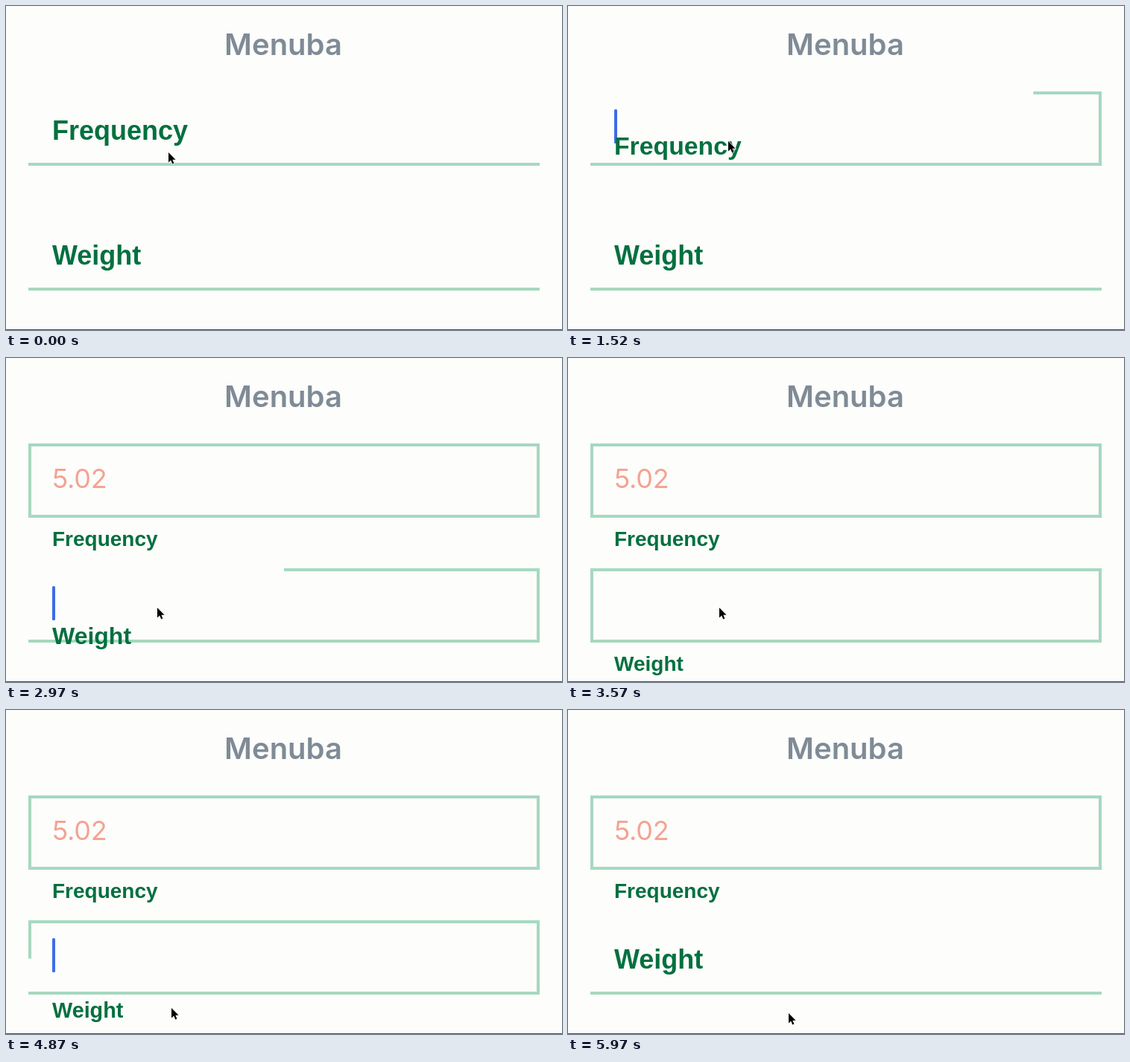
These frames come from a looping animation (746x436 px, 6070 ms). An HTML page:

```html
<!DOCTYPE html>
<html lang="en">
<head>
<meta charset="utf-8">
<title>Outlined inputs</title>
<style>
  html, body { margin: 0; width: 100%; height: 100%; overflow: hidden; background: #fdfdfc; }
  svg { display: block; width: 746px; height: 436px; }
  .title { font: 600 40px Inter, sans-serif; fill: #7f8b96; text-anchor: middle; }
  .label { font-family: "Liberation Sans", Arial, sans-serif; font-weight: 700; fill: #04703f; }
  .value { font: 400 36px Inter, sans-serif; letter-spacing: -.3px; fill: #f4a392; }
  .border { fill: #a6d8c0; }
  .caret { fill: #3c6ce6; }
</style>
</head>
<body>
<svg viewBox="0 0 746 436">
  <text class="title" x="372" y="66">Menuba</text>
  <g id="fields"></g>
  <rect y="435" width="746" height="1" fill="#4b4b4b"/>
  <path id="pointer" d="M0 0V13.5L3.2 10.6L5.2 15.4L7.4 14.5L5.4 9.8H9.6Z"
        stroke="#fff" stroke-width="1.4" paint-order="stroke"/>
</svg>
<script>
const LOOP = 6070, DURATION = 350, GLIDE = 360, KEY_GAP = 60;
const BOX = { x: 30, y: 115, w: 686, h: 100, line: 4 };

// Where the pointer comes to rest, and when
const rests = [
  { t: 0, x: 218, y: 197 },
  { t: 800, x: 283, y: 285 },
  { t: 1350, x: 215, y: 182 },
  { t: 2000, x: 168, y: 294 },
  { t: 2780, x: 203, y: 336 },
  { t: 4000, x: 278, y: 395 },
  { t: 4580, x: 216, y: 352 },
  { t: 4860, x: 222, y: 401 },
  { t: 5480, x: 296, y: 408 }
];

const clamp = v => Math.min(1, Math.max(0, v));
const ease = x => x < .5 ? 2 * x * x : 1 - 2 * (1 - x) ** 2;
const ramp = (t, from, to) => clamp((t - from) / (to - from));
const glide = (t, from, length) => ease(ramp(t, from, from + length));
const mix = (a, b, p) => a + (b - a) * p;

function set(el, attrs) {
  for (const key in attrs) el.setAttribute(key, attrs[key]);
  return el;
}

function add(parent, tag, attrs) {
  const el = document.createElementNS("http://www.w3.org/2000/svg", tag);
  parent.append(el);
  return set(el, attrs);
}

// toggles: times at which the outline opens, closes, opens ...
// leave: time at which the caret goes for good
function makeField({ name, top, toggles, leave, text = "", typeAt = 0 }) {
  const g = add(document.getElementById("fields"), "g", { transform: `translate(0 ${top})` });
  const { x, y, w, h, line } = BOX;
  const bar = attrs => add(g, "rect", { class: "border", ...attrs });
  bar({ x, y: y + h - line, width: w, height: line });
  const right = bar({ x: x + w - line, width: line });
  const upper = bar({ y, height: line });
  const left = bar({ x, y, width: line });
  const value = add(g, "text", { class: "value", x: 62, y: 175 });
  const caret = add(g, "rect", { class: "caret", y: 139, width: 4, height: 46, rx: 1.5 });
  const label = add(g, "text", { class: "label", x: 62 });
  label.textContent = name;

  return t => {
    const p = toggles.reduce((sum, at, i) => sum + (i % 2 ? -1 : 1) * glide(t, at, DURATION), 0);
    const rise = h * ramp(p, 0, .2);
    const run = w * ramp(p, .2, .8);
    set(right, { y: y + h - rise, height: rise });
    set(upper, { x: x + w - run, width: run });
    set(left, { height: h * ramp(p, .8, 1) });
    set(label, { y: mix(180, 253, p), "font-size": mix(36, 28, p) });

    const typed = Math.min(text.length, Math.max(0, Math.ceil((t - typeAt) / KEY_GAP)));
    value.textContent = text.slice(0, typed);

    // The caret blinks once a second, counted from the last focus or key
    const past = toggles.filter(at => at <= t);
    const focused = past.length % 2 === 1 && t < leave;
    const lastKey = typed ? typeAt + (typed - 1) * KEY_GAP : 0;
    const age = focused ? (t - Math.max(past.at(-1), lastKey)) % 1000 : 0;
    set(caret, {
      x: 62 + (typed ? value.getComputedTextLength() : 0),
      opacity: focused ? 1 - ramp(age, 270, 470) + ramp(age, 800, 1000) : 0
    });
  };
}

const fields = [
  makeField({
    name: "Frequency", top: 0, toggles: [460, 850, 1390], leave: 2780,
    text: "5.02", typeAt: 1580
  }),
  makeField({ name: "Weight", top: 168, toggles: [2796, 4023, 4598, 5480], leave: LOOP })
];

const pointer = document.getElementById("pointer");

function movePointer(t) {
  let { x, y } = rests[0];
  for (const rest of rests.slice(1)) {
    const p = glide(t, rest.t - GLIDE, GLIDE);
    x = mix(x, rest.x, p);
    y = mix(y, rest.y, p);
  }
  set(pointer, { transform: `translate(${x} ${y})` });
}

function draw() {
  const t = performance.now() % LOOP;
  fields.forEach(update => update(t));
  movePointer(t);
  requestAnimationFrame(draw);
}
draw();
</script>
</body>
</html>
```
